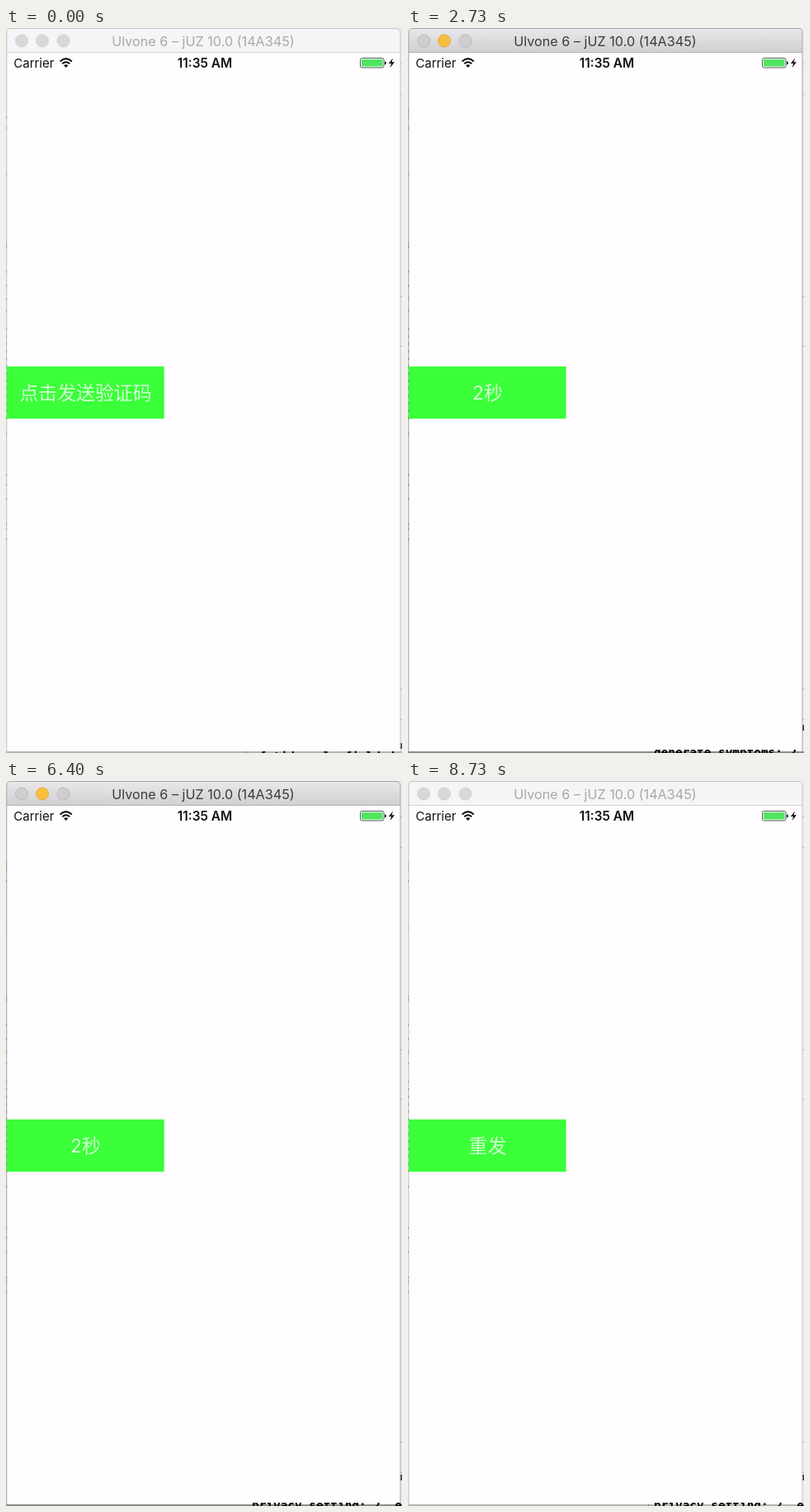
These frames come from a looping animation (480 by 878 pixels, 8870 ms). An HTML page:

```html
<!DOCTYPE html>
<html lang="zh">
<head>
<meta charset="utf-8">
<title>验证码倒计时</title>
<style>
  html, body { margin: 0; width: 100%; height: 100%; overflow: hidden; background: #fff; }
  svg { display: block; width: 480px; height: 878px; }
  text { font-family: Inter, "Noto Sans CJK SC", "Noto Sans CJK", sans-serif; }
  .mono { font: bold 14.4px "DejaVu Sans Mono", monospace; }
</style>
</head>
<body>
<svg viewBox="0 0 480 878">
  <defs>
    <linearGradient id="bar" x2="0" y2="1">
      <stop stop-color="#eae7ea"/><stop offset="1" stop-color="#d2cfd2"/>
    </linearGradient>
    <clipPath id="strip"><rect x="292" y="874" width="188" height="4"/></clipPath>
  </defs>

  <!-- desktop peeking out around the window -->
  <rect width="480" height="878" fill="#ececec"/>
  <g id="specks"></g>
  <path d="M478 43.5h2M478 80.5h2M478 325.5h2M478 385.5h2M478 800.5h2M478 837.5h2M0 800.5h1M0 837.5h1" stroke="#aaa"/>

  <!-- window -->
  <path d="M1 876V6Q1 1 6 1H473Q478 1 478 6V876Z" fill="#fffdff"/>
  <path id="titleBar" d="M1 29V6Q1 1 6 1H473Q478 1 478 6V29Z"/>
  <path id="rule" d="M1 29.5H478"/>
  <path id="frame" d="M.8 876V6Q.8 .5 6 .5H473Q478 .5 478 6V876" fill="none"/>
  <rect id="shade" y="876" width="480" height="2"/>
  <path d="M291.5 876v2" stroke="#777"/>
  <g clip-path="url(#strip)"><text id="log" class="mono" x="298"/></g>

  <g id="lights">
    <circle cx="19" cy="15.5" r="7.5"/>
    <circle id="yellow" cx="44" cy="15.5" r="7.5"/>
    <circle cx="69.5" cy="15.5" r="7.5"/>
  </g>
  <text id="title" x="239" y="21.7" font-size="16.2" text-anchor="middle">Ulvone 6 – jUZ 10.0 (14A345)</text>

  <!-- status bar -->
  <text x="9.3" y="47.6" font-size="15" fill="#111">Carrier</text>
  <path d="M65.6 40.4Q72.7 33.8 79.8 40.4M68.2 43.2Q72.7 39.2 77.2 43.2" fill="none" stroke="#111" stroke-width="2"/>
  <path d="M70 45.3Q72.7 43 75.4 45.3L72.7 48Z" fill="#111"/>
  <text x="241" y="47.8" font-size="15.4" font-weight="600" fill="#111" text-anchor="middle">11:35 AM</text>
  <rect x="429.5" y="36.5" width="28.5" height="11.5" rx="2" fill="#fff" stroke="#4b5f4e"/>
  <rect x="431" y="38" width="25.5" height="8.5" rx=".8" fill="#50e560"/>
  <path d="M459 40.2Q461 40.5 461 42.2T459 44.4Z" fill="#222"/>
  <path d="M469 36.5L463.8 43H467L465.6 48L471 41.2H467.6Z" fill="#111"/>

  <!-- button, with a soft edge -->
  <rect x="1" y="410" width="190.5" height="63" fill="#3aff39" stroke="#3aff39" stroke-opacity=".35"/>
  <text id="label" x="96.5" y="450.4" font-size="22.9" fill="#d4ffd4" text-anchor="middle"/>
</svg>
<script>
const LOOP = 8870;
const $ = id => document.getElementById(id);

// [start, value], each held until the next start
const LABELS = [
  [0, "点击发送验证码"], [1000, "3秒"], [2070, "2秒"], [3000, "1秒"], [4000, "重发"],
  [4870, "3秒"], [5870, "2秒"], [6870, "1秒"], [7870, "重发"]
];
const LOGS = [
  [0, { text: "of tidy - l. field d", y: 887, mark: 866 }],
  [1000, { text: "generate symptoms: 2", y: 882, mark: 844 }],
  [4870, { text: "privacy setting: 2, e", y: 882, mark: 840 }]
];
const ACTIVE = [[0, false], [870, true], [8400, false]];

const at = (track, t) => track.filter(k => k[0] <= t).pop()[1];
const setAll = (node, attrs) => {
  for (const name in attrs) node.setAttribute(name, attrs[name]);
};
const set = (id, attrs) => setAll($(id), attrs);

function addSpeck(x, y, height, fill) {
  const r = document.createElementNS("http://www.w3.org/2000/svg", "rect");
  setAll(r, { x, y, width: x ? 2 : 1, height, fill });
  return $("specks").appendChild(r);
}
[107, 120, 176, 260, 264, 294, 311, 327, 341, 363, 490, 540, 552, 569, 600, 605, 618]
  .forEach(y => addSpeck(0, y, 2.5, "#333"));
for (let y = 372; y < 480; y += 9) addSpeck(0, y, 3, "#444");
const tints = [[98, 11], [176, 4], [325, 6]].map(([y, h]) => addSpeck(0, y, h, "#6fae78"));
const mark = addSpeck(478, 866, 7, "#333");

function render(t) {
  const on = at(ACTIVE, t);
  const log = at(LOGS, t);
  set("titleBar", { fill: on ? "url(#bar)" : "#f6f4f6" });
  set("rule", { stroke: on ? "#b4b2b4" : "#d6d4d6" });
  set("frame", { stroke: on ? "#a5a5a5" : "#c4c4c4" });
  set("shade", { fill: on ? "#8c8c8c" : "#b4b4b4" });
  set("lights", { fill: on ? "#cfcdcf" : "#d9d7d9", stroke: on ? "#bbb8bb" : "#d4d2d4" });
  set("yellow", on ? { fill: "#f7be40", stroke: "#e3ad45" } : { fill: "#d9d7d9", stroke: "#d4d2d4" });
  set("title", { fill: on ? "#3c3b3c" : "#a9a8a9" });
  set("log", { y: log.y });
  $("log").textContent = log.text;
  $("label").textContent = at(LABELS, t);
  mark.setAttribute("y", log.mark);
  tints.forEach(r => r.setAttribute("opacity", t < 870 ? 0 : 1));
}

const start = performance.now();
function tick() {
  render((performance.now() - start) % LOOP);
  requestAnimationFrame(tick);
}
tick();
</script>
</body>
</html>
```
